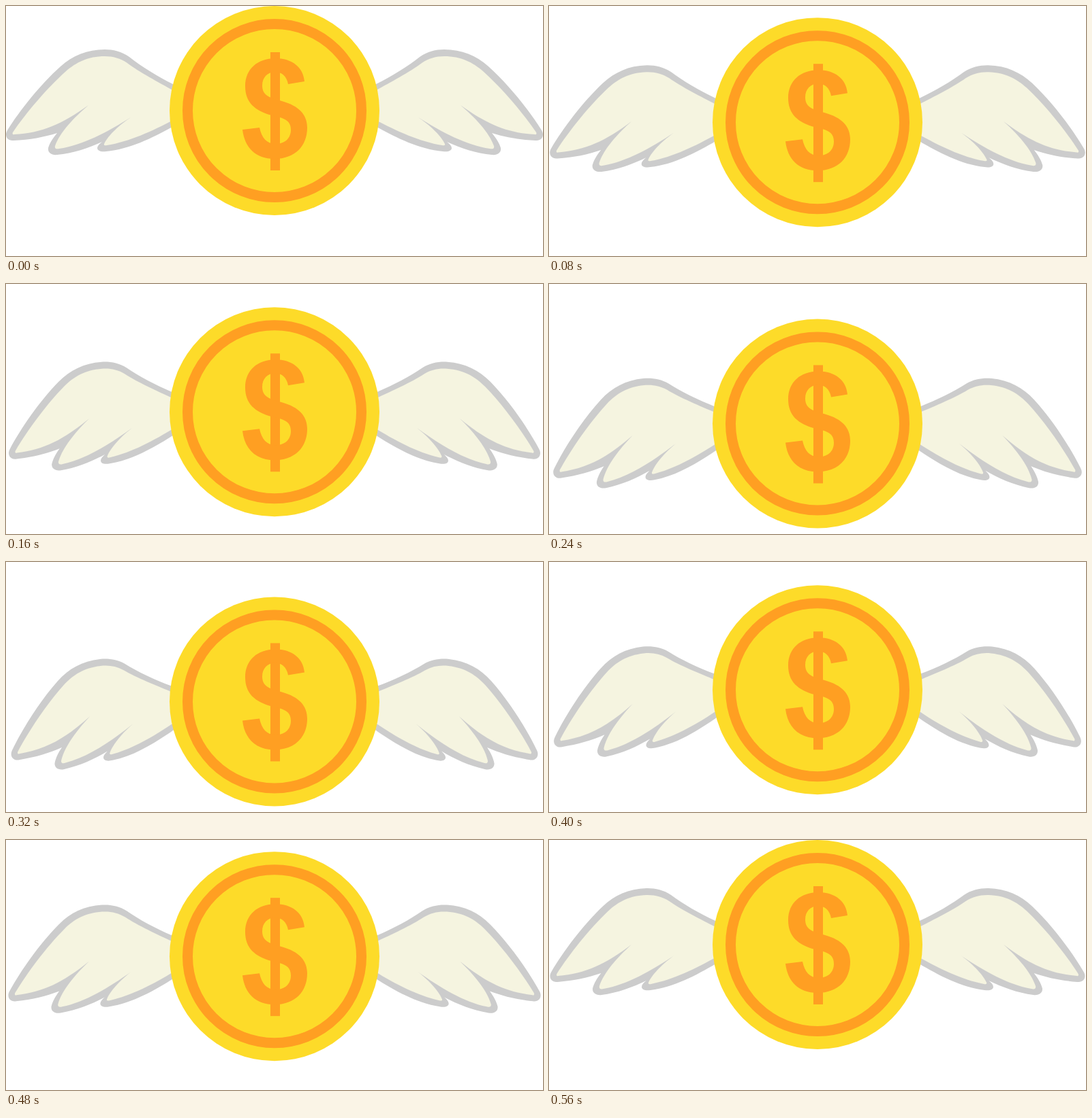
These frames come from a looping animation (788x368 px, 0.6 s). An HTML page:

```html
<!DOCTYPE html>
<html lang="en">
<head>
<meta charset="utf-8">
<title>Flying coin</title>
<style>
  html, body { margin: 0; width: 100%; height: 100%; overflow: hidden; background: #fff; }
  svg { display: block; width: 788px; height: 368px; }
</style>
</head>
<body>
<svg viewBox="0 0 788 368">
  <defs>
    <g id="wing">
      <path fill="#ccc" d="M270 128 L245 115 C223 104 197 88 181 75 C170 67 157 64 145 64
        C119 64 98 73 80 89 C50 116 20 154 2 183 C-3 191 2 199 11 198 C35 197 56 193 75 187
        C69 194 64 202 62 209 C61 216 67 220 75 219 C98 217 121 209 141 200
        C137 203 134 206 134 209 C134 213 139 215 147 214 C181 211 215 194 244 178 L270 165Z"/>
      <path fill="#f5f4e0" d="M270 138 L245 124 C225 113 195 97 178 84 C168 77 157 74 145 74
        C120 74 103 83 88 96 C60 121 29 158 10 186 C9 188 10 190 12 189 C52 187 82 174 121 146
        C100 164 79 186 72 206 C71 210 74 211 78 210 C112 205 148 186 183 164
        C168 174 150 190 144 203 Q143 206 148 205 C180 200 215 184 245 168 L270 155Z"/>
    </g>
  </defs>
  <g id="body">
    <g id="left"><use href="#wing"/></g>
    <g transform="translate(788) scale(-1 1)"><g id="right"><use href="#wing"/></g></g>
    <circle cx="394" cy="154" r="154" fill="#fddb29"/>
    <circle cx="394" cy="154" r="127.5" fill="none" stroke="#ff9f22" stroke-width="15"/>
    <g fill="#ff9f22">
      <rect x="388" y="68" width="14" height="174"/>
      <path d="M414 115 C412 103 404 97 395 97 C384 97 376 105 376 117 C376 132 387 135 405 140
        C430 147 442 160 442 179 C442 206 424 225 394 225 C366 225 350 208 347 182 L372 179
        C375 194 383 203 395 203 C409 203 418 195 418 182 C418 168 408 165 390 161
        C365 154 351 142 351 118 C351 93 369 77 395 77 C420 77 436 90 438 111Z"/>
    </g>
  </g>
</svg>
<script>
  const STEP = 40, STEPS = 15, DROP = 60;
  // Wing angle in degrees at every second step
  const angles = [0, 1.43, 3.88, 5.55, 6.45, 6.15, 3.4, 1.67];
  const [body, left, right] = ['body', 'left', 'right'].map(id => document.getElementById(id));

  const key = i => angles[Math.max(0, Math.min(angles.length - 1, i))];

  // Catmull-Rom curve through the angles
  function wingAngle(step) {
    const i = Math.floor(step / 2), u = step / 2 - i;
    const a = key(i - 1), b = key(i), c = key(i + 1), d = key(i + 2);
    return b + u / 2 * (c - a + u * (2 * a - 5 * b + 4 * c - d + u * (3 * (b - c) + d - a)));
  }

  function draw(ms) {
    const step = Math.floor(ms / STEP) % STEPS;
    const y = DROP * (1 - Math.abs(step - 7) / 7);
    const turn = `rotate(${-wingAngle(step)} 386 143)`;
    body.setAttribute('transform', `translate(0 ${y})`);
    left.setAttribute('transform', turn);
    right.setAttribute('transform', turn);
  }

  const start = performance.now();
  function tick() {
    draw(performance.now() - start);
    requestAnimationFrame(tick);
  }
  draw(0);
  requestAnimationFrame(tick);
</script>
</body>
</html>
```
